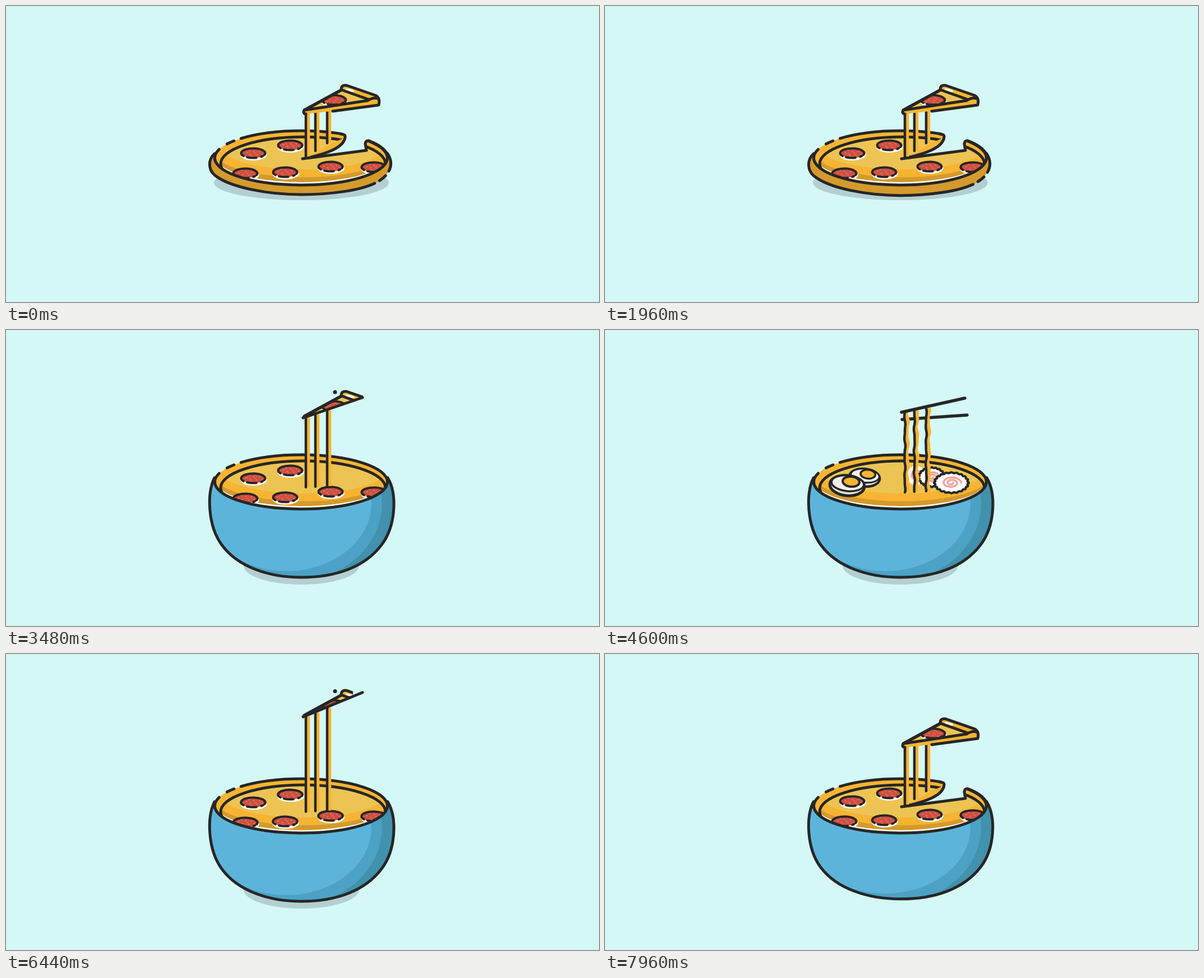
These frames come from a looping animation (1058 px wide and 529 px high, 8 s). An HTML page with a canvas:

```html
<!DOCTYPE html>
<html lang="en">
<head>
<meta charset="utf-8">
<title>Pizza and ramen</title>
<style>
  html, body { margin: 0; width: 100%; height: 100%; overflow: hidden; background: #d4f8f6; }
  canvas { display: block; }
</style>
</head>
<body>
<canvas id="stage" width="1058" height="529"></canvas>
<script>
const ctx = document.getElementById('stage').getContext('2d');
const LOOP = 8000, TAU = Math.PI * 2;
const BG = '#d4f8f6', INK = '#262626', CHEESE = '#edc453', CRUST = '#f7b432', DARK = '#d49a2d';
const RIM = [526.5, 271.5, 154, 48.5], SOUP = [530, 282, 147, 48];
const PEPPERONI = [[441, 263], [507, 249], [427, 299], [498, 297], [579, 287], [656, 288]];
const PAN = [372, 264, 360, 275, 361, 292, 372, 302, 400, 325, 470, 337, 527, 337,
  588, 337, 646, 327, 668, 311, 686, 299, 692, 281, 681, 264];
const BOWL = [372, 264, 358, 292, 360, 350, 385, 384, 414, 424, 470, 442, 527, 442,
  588, 442, 640, 424, 670, 384, 696, 350, 698, 292, 681, 264];

const lerp = (a, b, k) => a + (b - a) * k;
const clamp = x => Math.max(0, Math.min(1, x));
const linear = (t, a, b) => clamp((t - a) / (b - a));
const ease = (t, a, b) => {
  const u = linear(t, a, b);
  return u < .5 ? 4 * u ** 3 : 1 - 4 * (1 - u) ** 3;
};
const bump = (t, a, b, c) => ease(t, a, b) - ease(t, b, c);
const overshoot = u => 1 + 2.2 * (u - 1) ** 3 + 1.2 * (u - 1) ** 2;
const mix = (a, b, k) => `rgb(${a.map((v, i) => Math.round(lerp(v, b[i], k)))})`;

function paint(path, fill, stroke, width = 5) {
  if (fill) { ctx.fillStyle = fill; ctx.fill(path); }
  if (stroke) { ctx.strokeStyle = stroke; ctx.lineWidth = width; ctx.stroke(path); }
}
const svg = (d, fill, stroke, width) => paint(new Path2D(d), fill, stroke, width);
function oval(x, y, rx, ry, from = 0, to = TAU, tilt = 0) {
  const path = new Path2D();
  path.ellipse(x, y, rx, ry, tilt, from, to);
  return path;
}
function layer(draw) { ctx.save(); draw(); ctx.restore(); }
function scaled(x, y, k, draw) {
  if (k <= 0) return;
  layer(() => { ctx.translate(x, y); ctx.scale(k, k); draw(); });
}

function poseAt(t) {
  return {
    lift: -42 * bump(t, 480, 1240, 1800) - 32 * (ease(t, 1960, 2560) - ease(t, 7600, 8600))
      - 50 * (bump(t, 3560, 3800, 4160) + bump(t, 5960, 6330, 6700)) - 21 * bump(t, 7080, 7300, 7560),
    bowl: ease(t, 1840, 2610) - ease(t, 7760, 8690),
    shadow: ease(t, 1930, 2660) - ease(t, 7600, 8600),
    open: 1 - ease(t, 2560, 3200) + ease(t, 7080, 7500),
    cut: linear(t, 3400, 3600) - linear(t, 6350, 6550),
    sticks: ease(t, 3560, 3900) - ease(t, 6100, 6380),
    dip: linear(t, 3400, 3560) - linear(t, 6350, 6550),
    pizza: 1 - ease(t, 3480, 3720) + overshoot(linear(t, 6280, 6620)) * (t > 6280),
    ramen: t < 3640 ? 0 : t < 5960 ? overshoot(linear(t, 3640, 4080)) : 1 - ease(t, 5960, 6280)
  };
}

function drawBowl(p) {
  paint(oval(527, lerp(316, 421, p.shadow), lerp(156, 103, p.shadow), lerp(31, 34, p.shadow)), '#b3cfd1');
  const v = PAN.map((a, i) => lerp(a, BOWL[i], p.bowl));
  const path = new Path2D();
  path.moveTo(v[0], v[1]);
  for (let i = 2; i < v.length; i += 6) path.bezierCurveTo(...v.slice(i, i + 6));
  const tone = (...rgb) => mix([212, 154, 45], rgb, linear(p.bowl, .018, .036));
  layer(() => {
    ctx.clip(path);
    paint(path, tone(66, 145, 173));
    paint(oval(510, 310, 161, lerp(60, 140, p.bowl)), tone(75, 162, 197));
    paint(oval(500, 310, 152, lerp(50, 121, p.bowl)), tone(93, 180, 218));
  });
  layer(() => {
    if (p.bowl < .03) ctx.setLineDash([337, 10, 14, 10, 999]);
    paint(path, null, INK);
  });
}

function drawPepperoni(x, y) {
  paint(oval(x + 1, y + 2, 22, 9, .1, 2.9), null, '#fff', 4);
  paint(oval(x, y, 21, 8.5), '#cf4f40');
  for (let i = 0; i < 9; i++) {
    const r = Math.sqrt((i + .5) / 9) * 17, a = i * 2.4 + x;
    paint(oval(x + r * Math.cos(a), y + r * .36 * Math.sin(a), 1.7, .9), '#e07b6c');
  }
  paint(oval(x, y, 21.5, 8.5, 2.5, 6.65), null, INK, 4);
  paint(oval(x, y, 21.5, 8.5, .65, .85), null, INK, 4);
  paint(oval(x, y, 21.5, 8.5, 1.3, 2.1), null, INK, 4);
}

function drawEgg(x, y, k) {
  scaled(x, y, k, () => {
    paint(oval(0, 1, 31, 18, 0, TAU, .1), '#dfe3d8', INK, 5);
    paint(oval(1, -3, 29, 14, 0, TAU, .1), '#f1eeee', INK, 3.5);
    paint(oval(7, -6, 15, 9, 0, TAU, .1), CRUST, INK, 4);
  });
}

function drawFishCake(x, y, rx, ry, k, outline) {
  scaled(x, y, k, () => {
    const edge = new Path2D(), swirl = new Path2D();
    for (let i = 0; i <= 180; i++) {
      const a = i / 180 * TAU, r = 1 + .04 * Math.cos(20 * a);
      edge.lineTo(rx * r * Math.cos(a), ry * r * Math.sin(a));
      const b = a * 2, s = .1 + .48 * i / 180;
      swirl.lineTo(rx * s * Math.cos(b), ry * s * Math.sin(b));
    }
    paint(edge, '#fff', outline && INK, 4);
    paint(swirl, null, '#f0a49c', 3.5);
  });
}

function drawFood(p) {
  paint(oval(...RIM), CRUST);
  layer(() => {
    ctx.clip(oval(...RIM));
    layer(() => {
      ctx.clip(oval(...SOUP));
      paint(oval(...RIM), DARK);
      paint(oval(530, 262, 156, 44), CRUST);
      paint(oval(530, 250, 150, 42), CHEESE);
      paint(oval(527, 271, 153, 45, .3, 2.8), null, '#fff', 2.5);
      for (const [x, y] of PEPPERONI)
        scaled(x, y + 4 * p.dip, p.pizza, () => drawPepperoni(0, 0));
    });
    paint(oval(...SOUP), null, INK);
  });
  paint(oval(...RIM, -2.34, Math.PI + .32), null, INK);
  paint(oval(...RIM, Math.PI + .54, Math.PI + .68), null, INK);
  drawEgg(463, 263, p.ramen * .88);
  drawEgg(432, 277, p.ramen);
  drawFishCake(555, 260, 17, 17, p.ramen, false);
  drawFishCake(583, 263, 23, 17, p.ramen, true);
  drawFishCake(618, 273, 30, 18, p.ramen, true);
}

function drawGap(k) {
  if (k < .01) return;
  const at = (x, y, cx, cy) => `${lerp(cx, x, k)} ${lerp(cy, y, k)} `;
  const edge = at(605, 235, 643, 254) + 'C' + at(602, 254, 641, 257) + at(570, 264, 600, 262) + at(540, 271, 540, 271);
  svg(`M${at(600, 212, 650, 222)}L${at(600, 230, 643, 246)}L${edge}L643 258L641 246L647 239L668 222Z`, BG);
  svg(`M540 271L${at(580, 246, 600, 262)}L${edge}Z`, CRUST);
  svg(`M${at(598, 229, 641, 245)}Q${at(606, 229, 643, 247)} ${edge}`, null, INK);
  svg('M529 273L643 258L641 246Q642 240 648 241Q672 250 680 264', null, INK);
}

function drawStrands(p, top, t) {
  const ends = [[535, 269, 272], [552, 259, 271], [573, 245, 270]];
  ends.forEach(([x, open, closed], n) => {
    const end = lerp(closed, open, p.open) + 18 * p.dip;
    const strand = (dx, phase, amount, color, width) => {
      const path = new Path2D();
      for (let y = top(x); y < end; y += 3) {
        const sway = Math.sin(y * .17 + phase + n * 1.9 - t * .006) + .5 * Math.sin(y * .31 + phase - t * .004);
        path.lineTo(x + dx + p.sticks * amount * sway, y);
      }
      path.lineTo(x + dx, end);
      paint(path, null, color, width);
    };
    layer(() => { ctx.lineCap = 'butt'; strand(4, 1, 1.2, CRUST, 6.5); });
    strand(0, 0, .7, INK, 4.5);
  });
}

function drawSlice(p, tip, slope) {
  if (p.cut >= 1) return;
  const lineY = x => tip + slope * (x - 530);
  layer(() => {
    if (p.cut > 0) {
      const right = 690 - 130 * p.cut;
      ctx.clip(new Path2D(`M500 0H${right}V${lineY(right)}L500 ${lineY(500)}Z`));
    }
    ctx.translate(0, p.lift);
    const outline = 'M535 193Q529 192 532 186L598 150Q598 140 608 142L660 160Q668 165 665 177';
    svg(outline + 'L580 188Z', CRUST);
    const top = new Path2D('M532 186L599 150L647 168Z');
    layer(() => {
      paint(top, CHEESE);
      ctx.clip(top);
      drawPepperoni(585, 168);
    });
    svg('M608 149L619 152', null, '#fff', 4);
    svg('M533 186L599 150L647 167M533 186L645 169Q655 163 662 165', null, INK);
    svg(outline + (p.open > .5 ? 'L583 188' : 'L580 188Z'), null, INK);
  });
  if (p.cut > 0) {
    svg(`M530 ${tip + 1}L636 ${lineY(636)}`, null, INK);
    paint(oval(587, 143 + p.lift, 3.5, 3.5), INK);
  }
}

function render(now) {
  const t = now % LOOP, p = poseAt(t);
  ctx.fillStyle = BG;
  ctx.fillRect(0, 0, 1058, 529);
  ctx.lineCap = ctx.lineJoin = 'round';
  drawBowl(p);
  drawFood(p);
  drawGap(p.open);

  const tip = lerp(188, 179, p.sticks) + p.lift;
  const slope = lerp(-.13 - .5 * p.cut, -.223, p.sticks);
  const reach = 116 * p.sticks;
  if (p.sticks > 0) svg(`M530 ${tip + 13}l${reach} ${-.069 * reach}`, null, INK, 5.5);
  drawStrands(p, x => tip + slope * (x - 530) + 2, t);
  if (p.cut >= 1) svg(`M529 ${tip}L642 ${tip + slope * 113}`, null, INK, 5.5);
  drawSlice(p, tip, slope);
  requestAnimationFrame(() => render(performance.now()));
}
render(performance.now());
</script>
</body>
</html>
```
